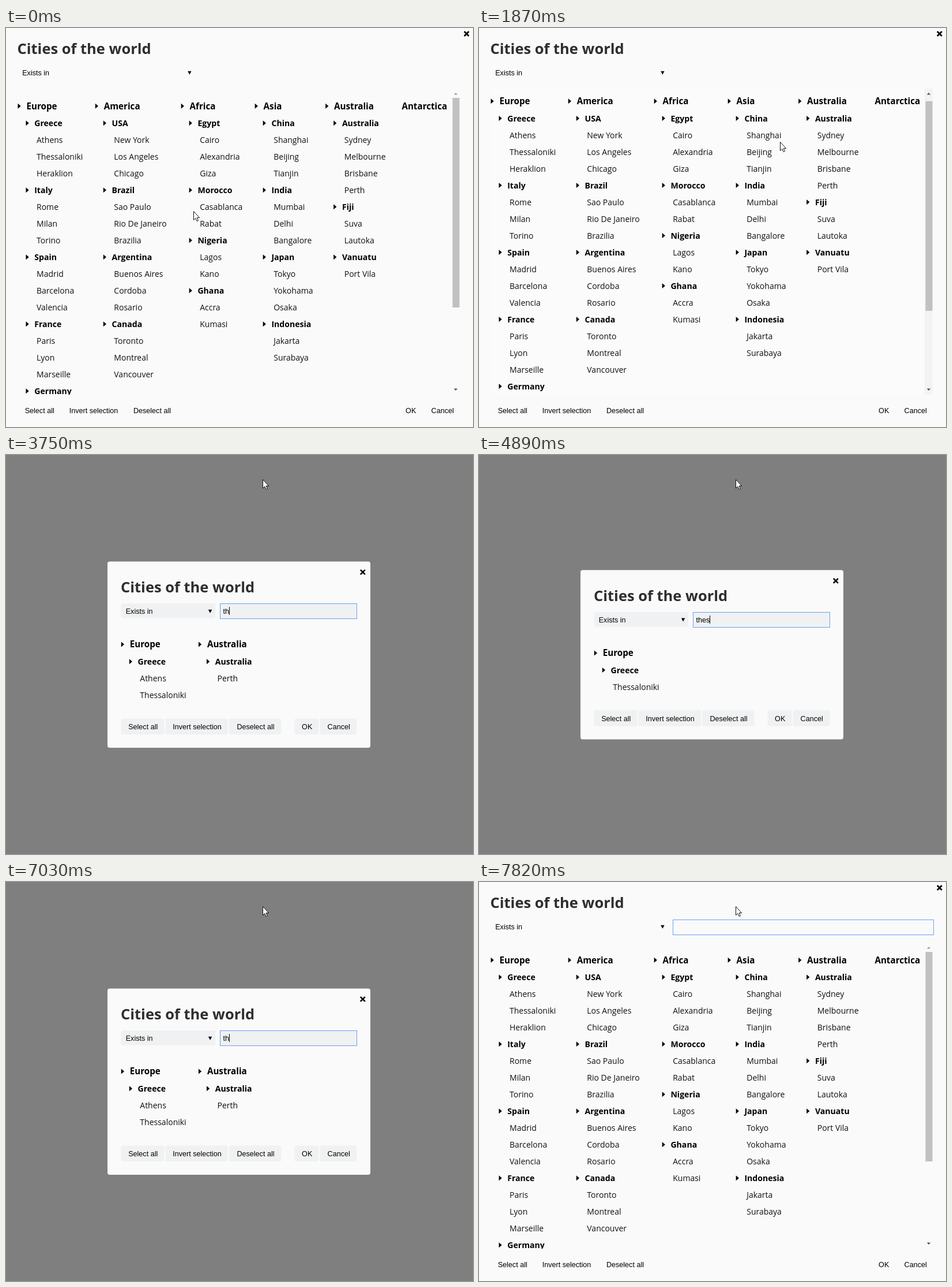
An HTML page with a canvas that plays this animation: 810x691 px, repeating every 8 s.

```html
<!DOCTYPE html>
<html lang="en">
<head>
<meta charset="utf-8">
<title>City filter</title>
<style>
  html, body { margin: 0; width: 100%; height: 100%; overflow: hidden; background: #fafafa; }
  canvas { display: block; }
</style>
</head>
<body>
<canvas id="stage" width="810" height="691"></canvas>
<script>
const ctx = document.getElementById('stage').getContext('2d');
const LOOP = 8000;
const MAX_SCROLL = 195.5;
const SANS = '"Open Sans", "Noto Sans", sans-serif';
const UI = '12.6px "Liberation Sans", Arial, sans-serif';
const FONTS = {
  title: '700 25.5px ' + SANS,
  top: '700 15.2px ' + SANS,
  group: '700 14.1px ' + SANS,
  item: '400 14px ' + SANS
};

const WORLD = [
  'Europe>Greece:Athens,Thessaloniki,Heraklion;Italy:Rome,Milan,Torino;Spain:Madrid,Barcelona,Valencia;' +
    'France:Paris,Lyon,Marseille;Germany:Munchen,Berlin,Frankfurt;Portugal:Porto,Funchal',
  'America>USA:New York,Los Angeles,Chicago;Brazil:Sao Paulo,Rio De Janeiro,Brazilia;' +
    'Argentina:Buenos Aires,Cordoba,Rosario;Canada:Toronto,Montreal,Vancouver',
  'Africa>Egypt:Cairo,Alexandria,Giza;Morocco:Casablanca,Rabat;Nigeria:Lagos,Kano;Ghana:Accra,Kumasi',
  'Asia>China:Shanghai,Beijing,Tianjin;India:Mumbai,Delhi,Bangalore;Japan:Tokyo,Yokohama,Osaka;' +
    'Indonesia:Jakarta,Surabaya',
  'Australia>Australia:Sydney,Melbourne,Brisbane,Perth;Fiji:Suva,Lautoka;Vanuatu:Port Vila',
  'Antarctica>'
].map(line => {
  const [name, rest] = line.split('>');
  const groups = rest ? rest.split(';').map(g => {
    const [title, items] = g.split(':');
    return { title, items: items.split(',') };
  }) : [];
  return { name, groups };
});

// Dialog edges and column positions for each typed query
const FULL = { l: -3.5, t: -8.5, r: 812, b: 699, cols: [20, 154.3, 303.2, 431.2, 553.7, 671] };
const TALL = { l: 176, t: 184.4, r: 632, b: 507, cols: [199.3, 333.5] };
const LAYOUT = {
  '': FULL,
  t: { l: 36, t: 97, r: 773, b: 595, cols: [59.5, 193.8, 308, 421, 541, 645] },
  th: TALL,
  the: TALL,
  thes: { l: 176, t: 199.3, r: 632, b: 492.5, cols: [199.3] }
};

// time, query, caret visible
const TYPING = [
  [0, '', false], [2350, '', true], [2920, '', false], [3350, '', true],
  [3600, 't', true], [3750, 'th', true], [3900, 'the', true], [4470, 'the', false],
  [4890, 'thes', true], [5450, 'thes', false], [5880, 'thes', true], [6470, 'thes', false],
  [6880, 'the', true], [7030, 'th', true], [7280, 't', true], [7550, 't', false], [7820, '', false]
];

const clamp = v => Math.max(0, Math.min(1, v));
const smooth = v => { v = clamp(v); return v * v * (3 - 2 * v); };
const mix = (a, b, k) => a + (b - a) * k;

// Progress from 0 to 1 in n equal jumps, the first at a and the last at b
function stepped(t, a, b, n) {
  if (t < a) return 0;
  return Math.min(1, (Math.floor((t - a) / (b - a) * (n - 1) + 1e-6) + 1) / n);
}

function filterWorld(query) {
  const hit = s => s.toLowerCase().includes(query);
  return WORLD.map(c => ({
    name: c.name,
    groups: c.groups
      .map(g => ({ title: g.title, items: g.items.filter(hit) }))
      .filter(g => g.items.length)
  })).filter(c => c.groups.length || hit(c.name));
}

// Baselines sit on whole pixels
function text(str, x, y, font, color = '#000') {
  ctx.font = font;
  ctx.fillStyle = color;
  ctx.fillText(str, x, Math.round(y));
}

function poly(points, color) {
  ctx.beginPath();
  points.forEach(([x, y]) => ctx.lineTo(x, y));
  ctx.closePath();
  ctx.fillStyle = color;
  ctx.fill();
}

function box(x, y, w, h, radius, color) {
  ctx.beginPath();
  ctx.roundRect(x, y, w, h, radius);
  ctx.fillStyle = color;
  ctx.fill();
}

const marker = (x, y) => poly([[x + 0.5, y - 4.5], [x + 5.7, y], [x + 0.5, y + 4.5]], '#000');

function drawLists(d, query, scroll) {
  filterWorld(query).forEach((c, i) => {
    const x = d.cols[i];
    let y = d.t + 149 - scroll;
    if (c.groups.length) marker(x, y - 5.3);
    text(c.name, x + 15.4, y, FONTS.top);
    y += 29.5;
    for (const g of c.groups) {
      marker(x + 14, y - 5.2);
      text(g.title, x + 29.2, y, FONTS.group);
      for (const item of g.items) {
        y += 29;
        text(item, x + 33, y, FONTS.item, '#111');
      }
      y += 29;
    }
  });
}

function drawScrollbar(scroll, track) {
  if (track) box(773, 105, 14, 530, 0, '#f3f3f3');
  box(774.5, 121 + 135 * scroll / MAX_SCROLL, 12, 363, 0, '#c1c1c1');
  const shade = on => on ? '#505050' : '#a3a3a3';
  poly([[776.7, 115.5], [783.3, 115.5], [780, 112]], shade(scroll > 1));
  poly([[776.7, 624.5], [783.3, 624.5], [780, 628]], shade(scroll < MAX_SCROLL - 1));
}

function drawControls(d, query, caret, focused, fill) {
  const x0 = d.l + 23.5, x1 = d.r - 23.5;
  const W = x1 - x0;
  const split = x0 + W * 0.4;
  const small = d !== FULL;
  const top = Math.round(d.t + 73);

  if (small) box(x0, top, split - x0, 25.5, 2, '#f0f1f2');
  text('Exists in', x0 + 8.2, d.t + 90.5, UI);
  const ax = split - 9, ay = d.t + 83.3;
  poly([[ax - 3.2, ay], [ax + 3.2, ay], [ax, ay + 6]], '#000');

  if (focused) {
    const ix = Math.floor(split + 8.7);
    box(ix, top, x1 - ix, 26, 1, fill);
    ctx.strokeStyle = '#6aa1f0';
    ctx.lineWidth = 1;
    ctx.strokeRect(ix + 0.5, top + 0.5, Math.floor(x1) - ix, 26);
    text(query, ix + 5.6, d.t + 90.5, UI);
    if (caret) {
      const cx = Math.round(ix + 5.2 + ctx.measureText(query).width);
      box(cx, Math.round(d.t + 78.6), 1, 14, 0, '#000');
    }
  }

  const buttons = [
    ['Select all', 0, 75], ['Invert selection', 77.3, 108], ['Deselect all', 187.5, 90.5],
    ['OK', W - 108, 42], ['Cancel', W - 64, 64]
  ];
  ctx.textAlign = 'center';
  for (const [label, x, w] of buttons) {
    if (small) box(x0 + x, d.b - 50.5, w, 27.5, 3, '#f0f1f2');
    text(label, x0 + x + w / 2 + 0.7, d.b - 32, UI);
  }
  ctx.textAlign = 'left';
}

function drawClose(x, y) {
  ctx.strokeStyle = '#000';
  ctx.lineWidth = 2.6;
  ctx.beginPath();
  ctx.moveTo(x - 4, y - 4);
  ctx.lineTo(x + 4, y + 4);
  ctx.moveTo(x + 4, y - 4);
  ctx.lineTo(x - 4, y + 4);
  ctx.stroke();
}

function drawPointer(x, y) {
  poly([[0.5, 0.5], [0.5, 15.5], [3.8, 12.5], [6.2, 17.6], [8.4, 16.6], [6.2, 11.6], [10.6, 11.6]]
    .map(([px, py]) => [x + px, y + py]), '#fff');
  ctx.strokeStyle = '#111';
  ctx.lineWidth = 1;
  ctx.stroke();
}

function pointerAt(out, back, up) {
  const move = smooth(back);
  let x = mix(325, 667, smooth(out)), y = mix(317, 467, smooth(out));
  x = mix(x, 455, move);
  y = mix(y, 72, move);
  return [mix(x, 445, up), mix(y, 42, up)].map(Math.round);
}

function draw(t) {
  const [, query, caret] = TYPING.findLast(k => k[0] <= t);
  const d = LAYOUT[query];
  const out = stepped(t, 150, 990, 7);
  const back = stepped(t, 1300, 2230, 8);
  const up = stepped(t, 2350, 2620, 3);
  const scroll = MAX_SCROLL * (smooth(out) - smooth(back * 1.4));
  const fresh = t >= 150 && t < 3600;

  ctx.fillStyle = '#7f7f7f';
  ctx.fillRect(0, 0, 810, 691);
  box(d.l, d.t, d.r - d.l, d.b - d.t, 4, '#fafafa');
  text('Cities of the world', d.l + 23, d.t + 53.3, FONTS.title, '#2e2e2e');
  drawClose(d.r - 13.2, d.t + 18.5);

  if (d === FULL) {
    if (fresh) box(20, 105, 753, 530, 0, '#fbfbfb');
    ctx.save();
    ctx.beginPath();
    ctx.rect(0, 105, 773, 530);
    ctx.clip();
    drawLists(d, query, scroll);
    ctx.restore();
    drawScrollbar(scroll, fresh);
  } else {
    drawLists(d, query, 0);
  }

  drawControls(d, query, caret, t >= 2350, t >= 7820 ? '#fafafa' : '#f0f1f2');
  drawPointer(...pointerAt(out, back, up));
}

function tick() {
  draw(performance.now() % LOOP);
  requestAnimationFrame(tick);
}
tick();
</script>
</body>
</html>
```
